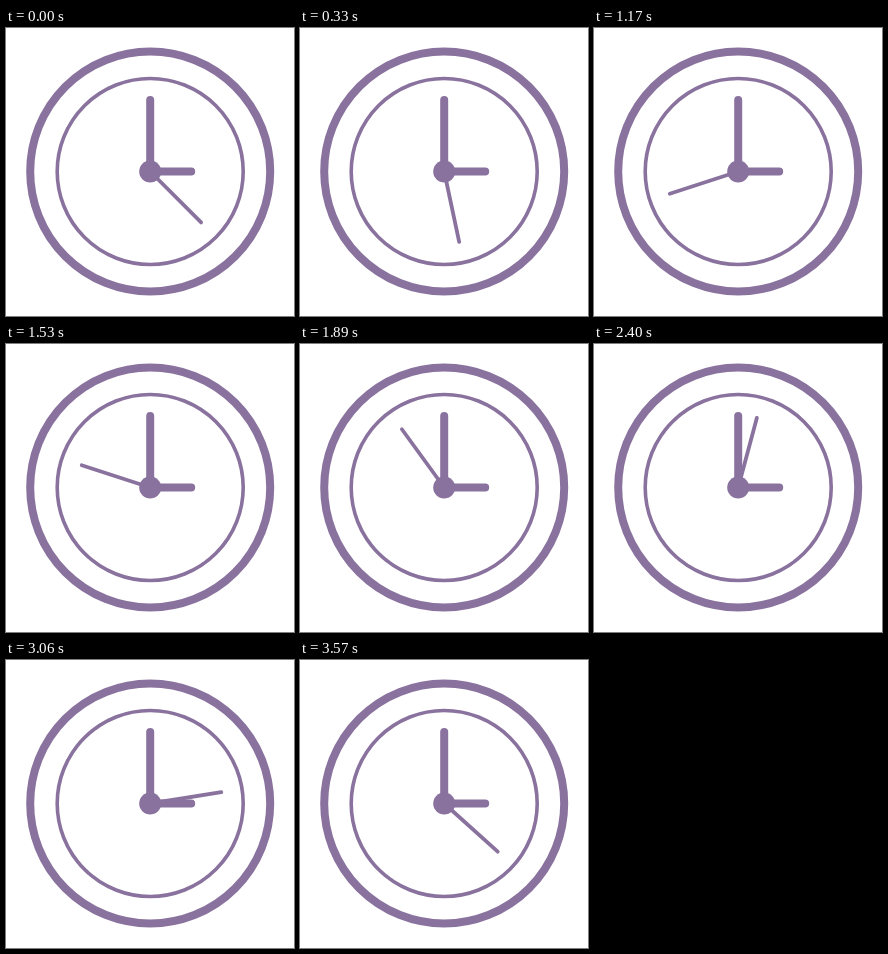
Animation, 288 px wide and 288 px high, one loop 3600 ms. Source, as an HTML page:

```html
<!DOCTYPE html>
<html lang="en">
<head>
<meta charset="utf-8">
<title>Clock</title>
<style>
  html, body { margin: 0; width: 100%; height: 100%; overflow: hidden; background: #fff; }
  svg { display: block; width: 100vw; height: 100vh; }
</style>
</head>
<body>
<svg viewBox="0 0 288 288">
  <g transform="translate(144.2 143.5)" fill="none" stroke="#8a729e" stroke-linecap="round">
    <circle r="120" stroke-width="8"/>
    <circle r="93" stroke-width="3.6"/>
    <path d="M0-71.5V0H41" stroke-width="8"/>
    <path id="second" d="M0 0V-72" stroke-width="3.8"/>
    <circle r="11" fill="#8a729e" stroke="none"/>
  </g>
</svg>
<script>
  const LOOP = 3600, STEP = 30, START_ANGLE = 135;
  const second = document.getElementById('second');
  const origin = performance.now();

  function draw() {
    const time = (performance.now() - origin) % LOOP;
    const ticks = Math.floor(time / STEP);
    const angle = START_ANGLE + ticks * STEP * 360 / LOOP;
    second.setAttribute('transform', `rotate(${angle})`);
    requestAnimationFrame(draw);
  }
  draw();
</script>
</body>
</html>
```
